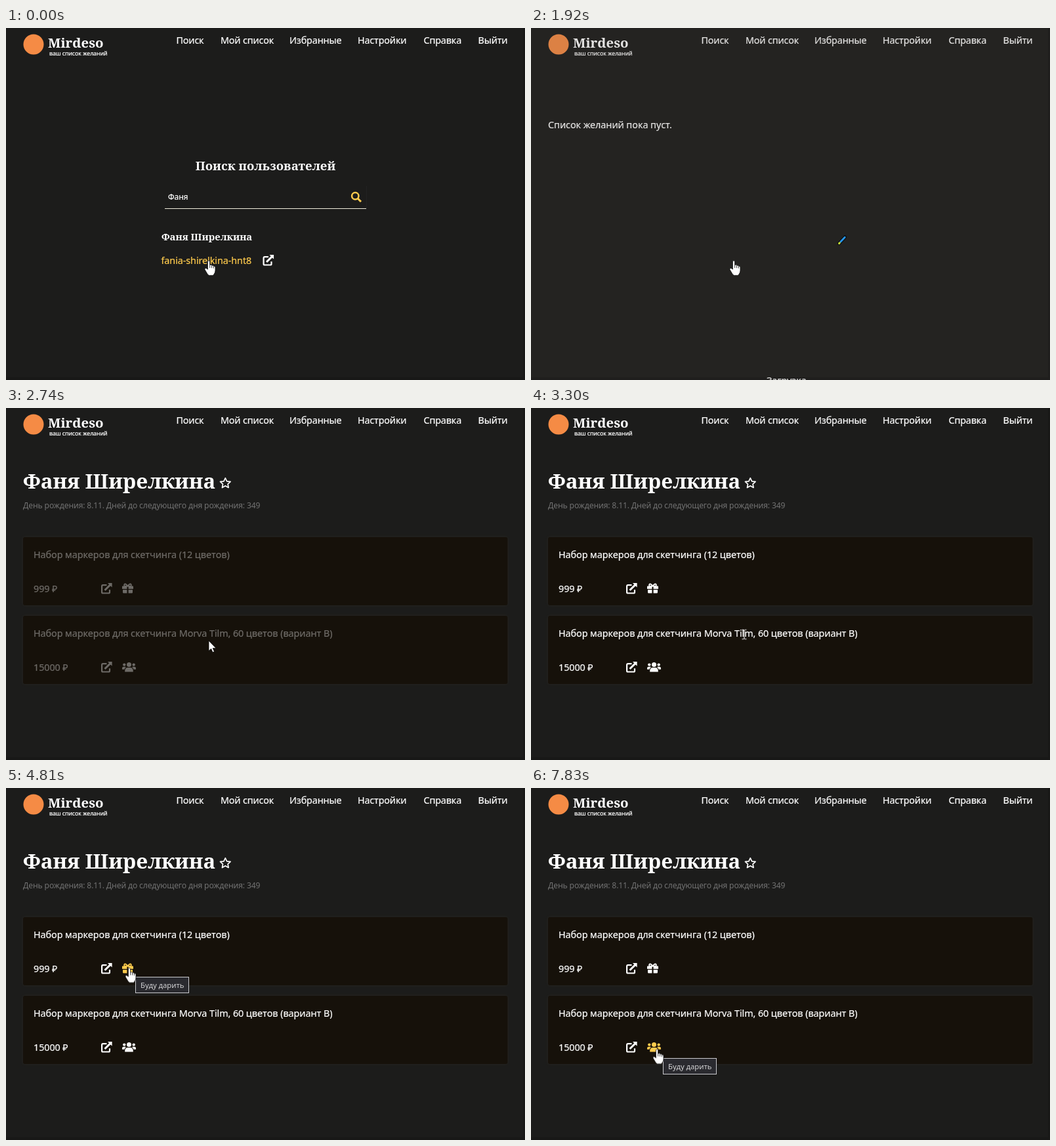
An HTML page for the animation above (8 s loop, 791x537 px).

```html
<!DOCTYPE html>
<html lang="ru">
<head>
<meta charset="utf-8">
<title>Список желаний</title>
<style>
html, body { margin: 0; width: 100%; height: 100%; overflow: hidden; background: #1c1c1b; }
svg { display: block; width: 791px; height: 537px; }
text {
  font: 14.4px "Noto Sans", "Open Sans", sans-serif; letter-spacing: -.09px;
  color: #fff; fill: currentColor; stroke: currentColor; stroke-width: .22px;
}
.nav text { letter-spacing: -.2px; }
.serif { font-family: "Noto Serif", serif; font-weight: 700; letter-spacing: 0; stroke: none; }
.nav .brand { font-size: 20.4px; letter-spacing: 0; }
.nav .slogan { font-size: 8.8px; letter-spacing: -.1px; }
.h1 { font-size: 31.4px; }
.h2 { font-size: 18.6px; text-anchor: middle; }
.h3 { font-size: 14.8px; }
.field { font-size: 12px; }
.note { font-size: 12.2px; letter-spacing: -.18px; color: #717171; stroke: none; }
.link { color: #ffcb4d; }
.tip rect { fill: #2a2a2f; stroke: #c9c9cd; }
.tip text { font-size: 11.3px; letter-spacing: -.05px; color: #d2d2d4; stroke: none; }
.card { fill: #16110a; filter: drop-shadow(0 0 2px rgba(255, 220, 160, .06)); }
.icon { color: #fff; }

/* One percent of the loop is 80 ms */
.anim { animation: 8s step-end infinite; }
#search { animation-name: search; }
#empty, #loader { animation-name: empty; }
#profile { animation-name: profile; }
#veil { animation-name: veil; }
#spark { animation-name: spark; }
#cards { animation-name: cards; }
#items { animation-name: items; }
#tipOpen { animation-name: tipOpen; }
#click { animation-name: click; }
#tipGift { animation-name: tipGift; }
#tipGroup { animation-name: tipGroup; }
#gift { animation-name: gift; }
#group { animation-name: group; }
#cursor { animation-name: cursor; }
#hand { animation-name: hand; }
#arrow { animation-name: arrow; }
#beam { animation-name: beam; }

@keyframes search { 0% { opacity: 1 } 17.125%, 100% { opacity: 0 } }
@keyframes empty { 0% { opacity: 0 } 17.125% { opacity: 1 } 30.875%, 100% { opacity: 0 } }
@keyframes profile { 0% { opacity: 0 } 30.875%, 100% { opacity: 1 } }
@keyframes veil {
  0% { opacity: 0 } 17.125% { opacity: .06 } 22.5% { opacity: .11 } 24% { opacity: .154 }
  25.5% { opacity: .19 } 30.875%, 100% { opacity: 0 }
}
@keyframes spark {
  0% { transform: translate(455px, 345px) }
  19.125% { transform: translate(464px, 336px) }
  22.5% { transform: translate(394px, 416px) }
  24% { transform: translate(474px, 324px) }
  25.5% { transform: translate(467px, 332px) }
  27.375% { transform: translate(440px, 363px) }
  29%, 100% { transform: translate(413px, 394px) }
}
@keyframes cards { 0% { opacity: 0 } 32.375%, 100% { opacity: 1 } }
@keyframes items {
  0% { opacity: .04 } 32.375% { opacity: .18 } 34.25% { opacity: .38 } 36.125% { opacity: .6 }
  37.875% { opacity: .82 } 39.5%, 100% { opacity: 1 }
}
@keyframes tipOpen { 0% { opacity: 0 } 5.125% { opacity: 1 } 6.875%, 100% { opacity: 0 } }
@keyframes click { 0% { opacity: 0 } 6.875% { opacity: .35 } 8.375%, 100% { opacity: 0 } }
@keyframes tipGift { 0% { opacity: 0 } 60.125% { opacity: 1 } 82.75%, 100% { opacity: 0 } }
@keyframes tipGroup { 0% { opacity: 0 } 97.875%, 100% { opacity: 1 } }
@keyframes gift { 0% { color: #fff } 53.125% { color: #ffcb4d } 82.75%, 100% { color: #fff } }
@keyframes group { 0% { color: #fff } 89.375%, 100% { color: #ffcb4d } }
@keyframes cursor {
  0% { transform: translate(309px, 355px) }
  37.875% { transform: translate(313px, 350px) }
  39.5% { transform: translate(320px, 343px) }
  41.25% { transform: translate(325px, 345.5px) }
  42.75% { transform: translate(326px, 346px) }
  44.375% { transform: translate(327px, 347px) }
  48.125% { transform: translate(305px, 335px) }
  50% { transform: translate(270px, 319px) }
  51.5% { transform: translate(225px, 297px) }
  53.125% { transform: translate(191px, 277px) }
  54.625% { transform: translate(188px, 274.5px) }
  82.75% { transform: translate(184.5px, 294.5px) }
  84.5% { transform: translate(187px, 320px) }
  86% { transform: translate(193px, 365px) }
  87.5% { transform: translate(199px, 397px) }
  89.375% { transform: translate(196px, 399px) }
  91%, 100% { transform: translate(192px, 398.5px) }
}
@keyframes hand {
  0% { opacity: 1 } 34.25% { opacity: 0 } 53.125% { opacity: 1 }
  82.75% { opacity: 0 } 89.375%, 100% { opacity: 1 }
}
@keyframes arrow {
  0% { opacity: 0 } 34.25% { opacity: 1 } 41.25% { opacity: 0 } 50% { opacity: 1 }
  53.125% { opacity: 0 } 82.75% { opacity: 1 } 89.375%, 100% { opacity: 0 }
}
@keyframes beam { 0% { opacity: 0 } 41.25% { opacity: 1 } 50%, 100% { opacity: 0 } }
</style>
</head>
<body>
<svg viewBox="0 0 791 537">
  <defs>
    <g id="open">
      <path d="M8.5 3.2H2.8Q1.1 3.2 1.1 5V14Q1.1 15.5 2.6 15.5H11.4Q13 15.5 13 14V10.3" fill="none" stroke="#fff" stroke-width="2.2"/>
      <path d="M10 0H16.6V6.6L14.3 4.4L6.6 12.1L4.5 10L12.2 2.3Z" fill="#fff"/>
    </g>
  </defs>

  <rect width="791" height="537" fill="#1c1c1b"/>

  <g class="nav">
    <circle cx="42" cy="25" r="15.5" fill="#f58b45"/>
    <text class="serif brand" x="64" y="30">Mirdeso</text>
    <text class="slogan" x="66" y="42">ваш список желаний</text>
    <text x="259.5" y="24">Поиск</text>
    <text x="327" y="24">Мой список</text>
    <text x="432" y="24">Избранные</text>
    <text x="536" y="24">Настройки</text>
    <text x="636.5" y="24">Справка</text>
    <text x="719.5" y="24">Выйти</text>
  </g>

  <g id="search" class="anim">
    <text class="serif h2" x="395.5" y="216.5">Поиск пользователей</text>
    <text class="field" x="247" y="262">Фаня</text>
    <path d="M549.5 241V275" stroke="#222"/>
    <path d="M242 275.5H549" stroke="#f0ecdc"/>
    <g fill="none" stroke="#ffcb4d">
      <circle cx="532.3" cy="256.3" r="5.2" stroke-width="2.5"/>
      <path d="M536.3 260.3L541 265" stroke-width="3"/>
    </g>
    <text class="serif h3" x="237" y="324">Фаня Ширелкина</text>
    <text class="link" x="236.5" y="360">fania-shirelkina-hnt8</text>
    <use href="#open" x="391.5" y="346"/>
  </g>

  <g id="profile" class="anim">
    <text class="serif h1" x="26" y="123">Фаня Ширелкина</text>
    <path transform="translate(334.3 114.8)" fill="none" stroke="#fff" stroke-width="1.7" stroke-linejoin="round"
      d="M0-8L2.4-3L7.8-2.4L3.8 1.3L4.8 6.7L0 4L-4.8 6.7L-3.8 1.3L-7.8-2.4L-2.4-3Z"/>
    <text class="note" x="26" y="153">День рождения: 8.11. Дней до следующего дня рождения: 349</text>

    <g id="cards" class="anim">
      <rect class="card" x="26" y="197" width="738.5" height="104" rx="3"/>
      <rect class="card" x="26" y="317" width="738.5" height="104" rx="3"/>
    </g>

    <g id="items" class="anim">
      <text x="42" y="229">Набор маркеров для скетчинга (12 цветов)</text>
      <text x="42" y="281">999 ₽</text>
      <use href="#open" x="145" y="267"/>
      <g transform="translate(177 267.5)">
        <g id="gift" class="icon anim" fill="currentColor">
          <path d="M1.2 4H7.4V8.6H0V5.2Q0 4 1.2 4ZM9.6 4H15.8Q17 4 17 5.2V8.6H9.6ZM1 9.8H7.4V15H2.2Q1 15 1 13.8ZM9.6 9.8H16V13.8Q16 15 14.8 15H9.6Z"/>
          <path d="M8.5 4.4Q6 .9 4.6 1Q2.8 1.2 3.2 3.2Q3.6 4.4 8.5 4.4Q13.4 4.4 13.8 3.2Q14.2 1.2 12.4 1Q11 .9 8.5 4.4" fill="none" stroke="currentColor" stroke-width="1.8"/>
        </g>
      </g>

      <text x="42" y="349">Набор маркеров для скетчинга Morva Tilm, 60 цветов (вариант B)</text>
      <text x="42" y="401">15000 ₽</text>
      <use href="#open" x="145" y="387"/>
      <g transform="translate(177 387.5)">
        <g id="group" class="icon anim" fill="currentColor">
          <circle cx="10.5" cy="4" r="3.5"/>
          <circle cx="3.3" cy="4.1" r="2.2"/>
          <circle cx="17.7" cy="4.1" r="2.2"/>
          <path d="M4.2 15Q4.2 8.6 8 8.6H13Q16.8 8.6 16.8 15ZM0 11.2V9.6Q0 7.3 2.2 7.3H4.6Q5.6 7.3 6 7.8Q3.9 9 3.6 11.2ZM21 11.2V9.6Q21 7.3 18.8 7.3H16.4Q15.4 7.3 15 7.8Q17.1 9 17.4 11.2Z"/>
        </g>
      </g>
    </g>
  </g>

  <g id="empty" class="anim">
    <text x="26" y="153">Список желаний пока пуст.</text>
  </g>
  <rect id="veil" class="anim" width="791" height="537" fill="#504c40" opacity="0"/>
  <g id="loader" class="anim">
    <g id="spark" class="anim" stroke-linecap="round">
      <path d="M-4.5 4.7L4.5-5" stroke="#080c10" stroke-width="5"/>
      <path d="M-2 2L4.3-4.8" stroke="#2795e8" stroke-width="2.8"/>
      <path d="M-4.4 4.6L-3.6 3.8" stroke="#c6dc38" stroke-width="3"/>
    </g>
    <text x="359" y="542.5">Загрузка...</text>
  </g>

  <path d="M0 533H788V0H791V537H0Z" fill="#000" opacity=".12"/>

  <g id="tipOpen" class="tip anim">
    <rect x="318.5" y="369.5" width="112" height="24"/>
    <text x="326" y="386">Открыть страницу</text>
  </g>
  <g id="tipGift" class="tip anim">
    <rect x="197.5" y="288.5" width="81" height="24"/>
    <text x="205" y="305">Буду дарить</text>
  </g>
  <g id="tipGroup" class="tip anim">
    <rect x="201.5" y="412.5" width="81" height="24"/>
    <text x="209" y="429">Буду дарить</text>
  </g>

  <circle id="click" class="anim" cx="309.5" cy="355.5" r="10.5" fill="#ffdc4d"/>

  <g id="cursor" class="anim">
    <g id="hand" class="anim">
      <path fill="#fff" stroke="#111" stroke-width=".8"
        d="M-1.6 1.2Q0-1.6 1.6 1.2V6.6Q3.7 5.3 4.6 7.3Q6.6 6.2 7.4 8.3Q9.9 7.6 10 10V15Q10 18 8 20.6Q7.6 22.4 6 22.4H.6Q-1.5 22.2-3 18.6L-6 13.6Q-6.5 10.8-4 11.4L-1.6 13.2Z"/>
      <path d="M1.7 6.6V11M4.6 7.4V11.2M7.4 8.4V11.6" stroke="#222" stroke-width=".9"/>
    </g>
    <path id="arrow" class="anim" fill="#fff" stroke="#0a0a0a" stroke-width=".8"
      d="M0 0V15.6L3.6 12.3L6 17.7L8.5 16.6L6.2 11.4H11Z"/>
    <path id="beam" class="anim" fill="none" stroke="#fff"
      d="M-3.5-7H-1L0-6.3L1-7H3.5M0-6.3V6.3M-3.5 7H-1L0 6.3L1 7H3.5"/>
  </g>
</svg>
</body>
</html>
```
